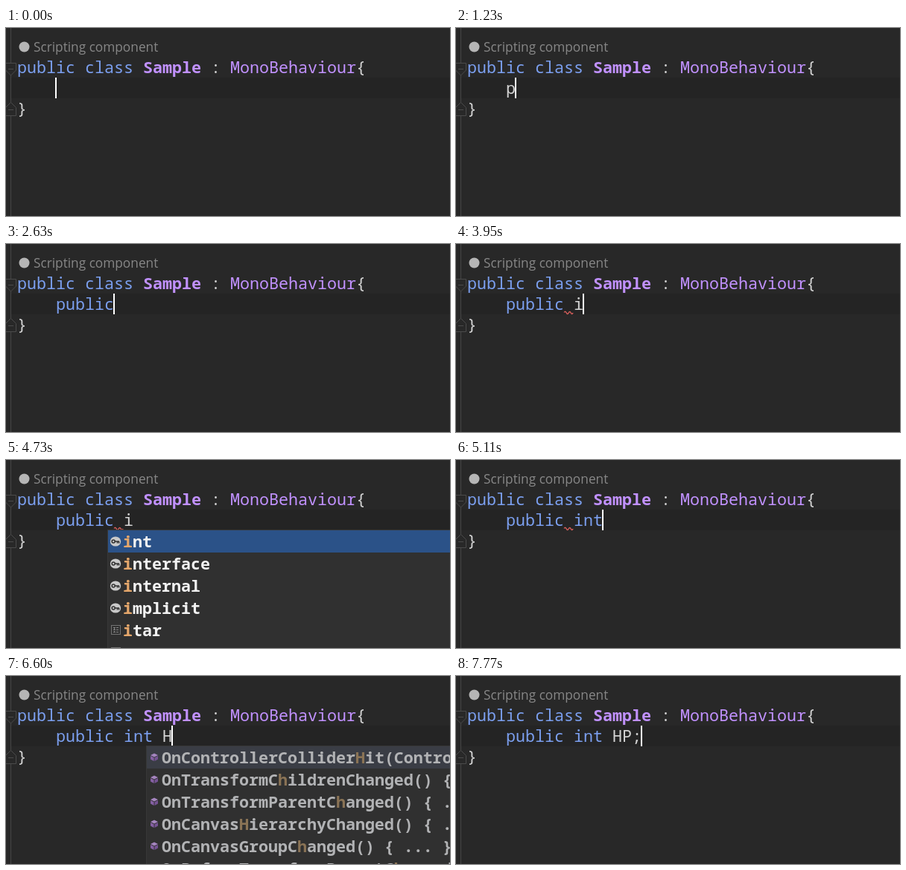
An HTML page for the animation above (8000 ms loop, 596 px wide and 254 px high).

```html
<!DOCTYPE html>
<html lang="en">
<head>
<meta charset="utf-8">
<title>Code completion</title>
<style>
  html, body { margin: 0; width: 100%; height: 100%; overflow: hidden; background: #282828; }
  svg { display: block; width: 596px; height: 254px; }
  text { font: 21.667px "Noto Sans Mono", monospace; fill: #d4d4d4; white-space: pre; }
  .hint { font: 17.25px "Open Sans", "Noto Sans", sans-serif; fill: #878787; }
  .keyword { fill: #7b9fef; }
  .type { fill: #c191ff; }
  .bold, .item { font-weight: 700; }
  .item { fill: #f2f2f2; }
  .item .hit { fill: #e5a76b; }
  .method { fill: #b2b3b5; }
  .method .hit { fill: #8a7355; }
  .fold { fill: #282828; stroke: #4b4b4b; }
</style>
</head>
<body>
<svg viewBox="0 0 596 254">
  <defs>
    <g id="key">
      <ellipse rx="7.2" ry="6.6" fill="#c9c9c9"/>
      <path d="M-1 0H5M2.5 0V2.6M4.6 0V2.6" fill="none" stroke="#333" stroke-width="1.6"/>
      <circle cx="-2.8" r="2" fill="none" stroke="#333" stroke-width="1.6"/>
    </g>
    <g id="template" fill="none" stroke="#b4b4b4">
      <rect x="-5.5" y="-6.5" width="12" height="12" stroke-dasharray="1 1"/>
      <path d="M-3 -3.5H4M-3 -.5H4M-3 2.5H4M-1.5 -3V3" stroke="#858585" stroke-dasharray="3 1"/>
    </g>
    <g id="cube">
      <path d="M0 -5.6L5 -3L0 -.6L-5 -3Z" fill="#a585bf"/>
      <path d="M-5 -2L-.5 .3V5L-5 2.6Z" fill="#8560a3"/>
      <path d="M5 -2L.5 .3V5L5 2.6Z" fill="#755293"/>
    </g>
  </defs>

  <rect width="596" height="254" fill="#282828"/>
  <rect x="7" y="67" width="589" height="28" fill="#242424"/>
  <path d="M6.5 0V254" stroke="#454545"/>
  <path class="fold" d="M-.5 47.5H13.5V57L6.5 64L-.5 57ZM3 55.5H10"/>
  <path class="fold" d="M-.5 118.5H13.5V107.5L6.5 100.5L-.5 107.5ZM3 110.5H10"/>
  <circle cx="24.5" cy="25.5" r="7" fill="#b5b5b5"/>
  <text class="hint" x="37" y="32">Scripting component</text>
  <g id="code"></g>
  <path id="squiggle" d="M1.2 92.5q1.5 -2.6 3 .5t3 0t3 0t2.8 0"
        fill="none" stroke="#d9605c" stroke-width="1.4"/>
  <rect id="caret" y="67" width="2" height="28" fill="#fff"/>
  <g id="popups"></g>
</svg>
<script>
const LOOP = 8000, LEFT = 14, CELL = 13, ROW = 30;
const byId = id => document.getElementById(id);
const columnX = col => LEFT + CELL * col;

function add(parent, tag, attrs, content = '') {
  const el = document.createElementNS('http://www.w3.org/2000/svg', tag);
  for (const name in attrs) el.setAttribute(name, attrs[name]);
  el.innerHTML = content;
  return parent.appendChild(el);
}

// Holds each value from its time until the next step.
function track(el, prop, steps) {
  const frames = steps.map(([time, value]) =>
    ({ offset: time / LOOP, [prop]: value, easing: 'step-end' }));
  frames.push({ offset: 1, [prop]: steps[steps.length - 1][1] });
  el.animate(frames, { duration: LOOP, iterations: Infinity });
}

function showBetween(el, start, end = LOOP) {
  const steps = [[0, 0], [start, 1]];
  if (end < LOOP) steps.push([end, 0]);
  track(el, 'opacity', steps);
}

function moveColumns(el, steps) {
  track(el, 'transform', steps.map(([time, col]) => [time, `translate(${columnX(col)}px, 0px)`]));
}

function write(col, line, content, kind = '') {
  return add(byId('code'), 'text', { x: columnX(col) + 1, y: 61 + 28 * line, class: kind }, content);
}

function popup(col, start, end, selected, kind, items) {
  const x = columnX(col) - 21;
  const box = add(byId('popups'), 'g', {});
  add(box, 'rect', { x, y: 94, width: 600, height: 200, fill: '#383838' });
  add(box, 'rect', { x: x + 1, y: 95, width: 600, height: 200, fill: '#303030' });
  add(box, 'rect', { x: x + 1, y: 95, width: 600, height: ROW, fill: selected });
  items.forEach(([icon, label], i) => {
    add(box, 'use', { href: '#' + icon, x: x + 11, y: 110 + ROW * i });
    const content = label.replace(/\[(.)\]/, '<tspan class="hit">$1</tspan>');
    add(box, 'text', { x: x + 21, y: 118 + ROW * i, class: 'item ' + kind }, content);
  });
  showBetween(box, start, end);
}

write(0, 0, 'public class', 'keyword');
write(13, 0, 'Sample', 'type bold');
write(20, 0, ':');
write(22, 0, 'MonoBehaviour', 'type');
write(35, 0, '{');
write(0, 2, '}');

showBetween(write(4, 1, 'p'), 1230, 2630);
showBetween(write(4, 1, 'public', 'keyword'), 2630);
showBetween(write(11, 1, 'i'), 3950, 5110);
showBetween(write(11, 1, 'int', 'keyword'), 5110);
showBetween(write(15, 1, 'H'), 6530);
showBetween(write(16, 1, 'P'), 6920);
showBetween(write(17, 1, ';'), 7700);

const caret = byId('caret'), squiggle = byId('squiggle');
moveColumns(caret, [[0, 4], [1230, 5], [2630, 10], [2710, 11], [3950, 12],
  [5110, 14], [5660, 15], [6530, 16], [6920, 17], [7700, 18]]);
track(caret, 'opacity', [[0, 1], [210, 0], [680, 1], [1700, 0], [2250, 1], [4730, 0], [5110, 1]]);
moveColumns(squiggle, [[0, 10], [5340, 14], [5660, 15], [5810, 14]]);
track(squiggle, 'opacity', [[0, 0], [2790, 1], [5190, 0], [5340, 1], [6530, 0], [6920, 1], [7770, 0]]);

popup(4, 1320, 2630, '#2b5288', '', [
  ['key', '[p]ublic'], ['key', '[p]artial'], ['key', '[p]rivate'],
  ['key', '[p]rotected'], ['template', '[p]ci'], ['template', '']]);
popup(11, 4030, 5110, '#2b5288', '', [
  ['key', '[i]nt'], ['key', '[i]nterface'], ['key', '[i]nternal'],
  ['key', '[i]mplicit'], ['template', '[i]tar'], ['template', '']]);
popup(15, 6600, 6920, '#3a3d45', 'method', [
  ['cube', 'OnControllerCollider[H]it(ControllerColliderHit hit)'],
  ['cube', 'OnTransformC[h]ildrenChanged() { ... }'],
  ['cube', 'OnTransformParentC[h]anged() { ... }'],
  ['cube', 'OnCanvas[H]ierarchyChanged() { ... }'],
  ['cube', 'OnCanvasGroupC[h]anged() { ... }'],
  ['cube', 'OnBeforeTransformParentC[h]anged() { ... }']]);
</script>
</body>
</html>
```
